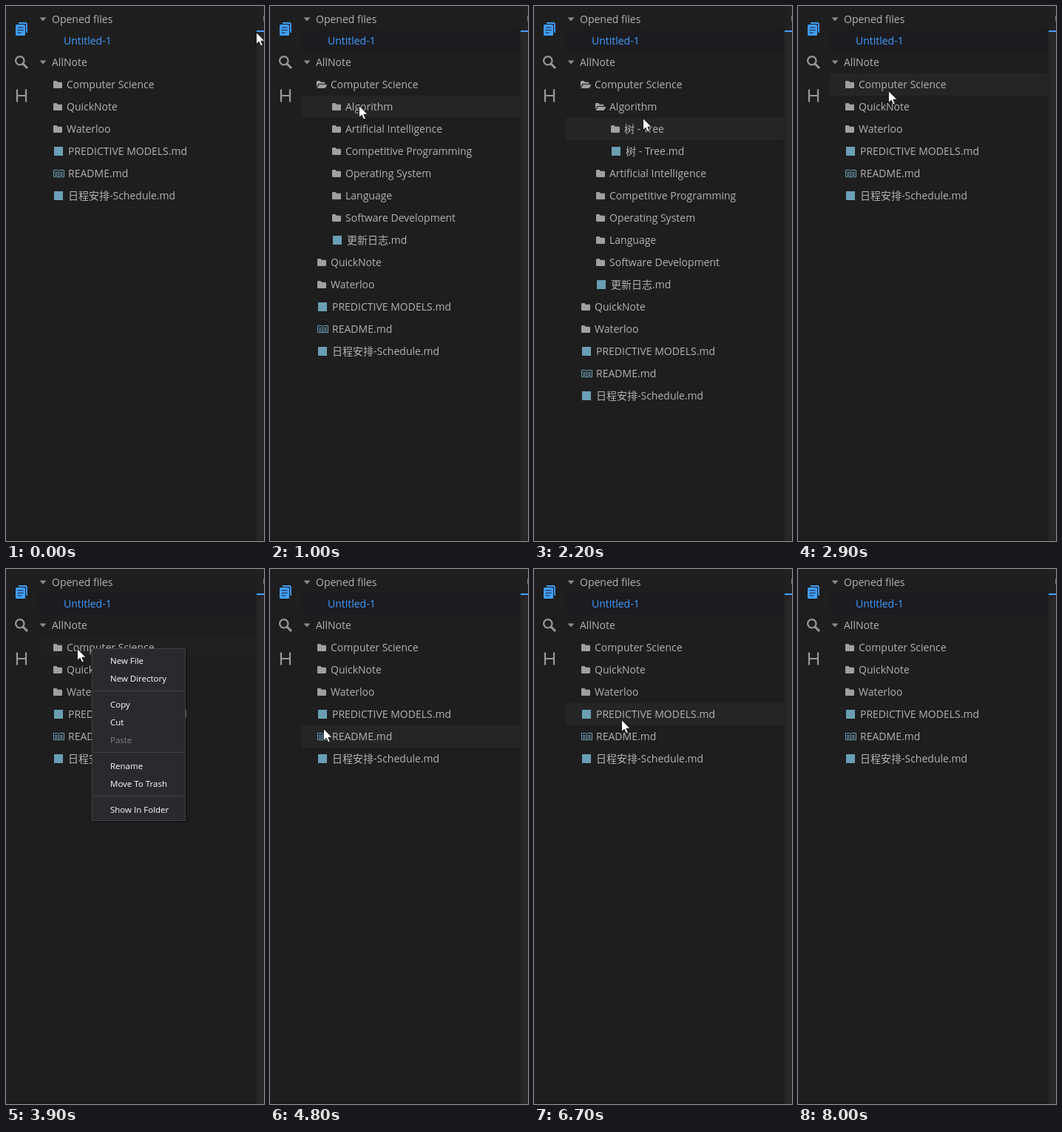
An HTML page for the animation above (8.3 s loop, 349 by 722 pixels).

```html
<!DOCTYPE html>
<html lang="en">
<head>
<meta charset="utf-8">
<title>File tree</title>
<style>
  html, body { margin: 0; width: 100%; height: 100%; overflow: hidden; background: #1e1e1e; }
  svg { display: block; }
  text { font: 14px "Open Sans", "Noto Sans CJK SC", "Noto Sans CJK", sans-serif; fill: #b2b2b2; white-space: pre; }
  #menu text { font-size: 11.5px; fill: #fff; }
  #menu text.off { fill: #808183; }
</style>
</head>
<body>
<svg width="349" height="722" viewBox="0 0 349 722">
  <defs>
    <path id="folder" fill="#a0a0a0" d="M1 1.2Q1 0 2.2 0H5.4L6.9 1.7H11.8Q13 1.7 13 2.9V8.8Q13 10 11.8 10H2.2Q1 10 1 8.8Z"/>
    <path id="open" fill="#a0a0a0" d="M0 8.4V1.2Q0 0 1.1 0H4.4L5.9 1.7H10.2Q11.3 1.7 11.3 2.8V4H3.6Q2.5 4 2 5ZM.6 10L3 5.7Q3.3 5 4.1 5H13.8Q14.6 5 14.2 5.7L12.1 9.3Q11.7 10 10.9 10Z"/>
    <rect id="md" x="2" y="-1" width="12" height="12" fill="#6a9fb5"/>
    <path id="book" fill="none" stroke="#6a9fb5" d="M1.5 .5H7.5L8.5 1.5L9.5 .5H15.5V9.5H9.5L8.5 10.5L7.5 9.5H1.5ZM8.5 1.5V10M3 3.5H7M3 5.5H7M3 7.5H7M10 3.5H14M10 5.5H14M10 7.5H14"/>
  </defs>

  <rect width="349" height="722" fill="#1e1e1e"/>
  <rect x="339" width="10" height="722" fill="#272727"/>
  <rect x="339" width="10" height="33" fill="#212121"/>
  <rect x="339" y="33" width="10" height="2" fill="#409eff"/>
  <rect x="348" y="13" width="1" height="7" fill="#777"/>
  <rect y="720" width="339" height="2" fill="#191919"/>

  <g fill="none" stroke="#409eff" stroke-width="1.8">
    <path d="M17 23H26Q28 23 28 25V36"/>
    <rect x="13" y="25" width="13" height="15" rx="1.5" fill="#409eff" stroke="none"/>
    <path d="M15.5 29H23.5M15.5 32.5H23.5M15.5 36H21" stroke="#1e1e1e" stroke-width="1.2"/>
  </g>
  <g fill="none" stroke="#9a9a9a" stroke-width="2.2">
    <circle cx="18.8" cy="73.8" r="5.7"/>
    <path d="M23 78L29 84" stroke-width="3"/>
    <path d="M15 112.5V129.5M27 112.5V129.5M15 121H27"/>
  </g>

  <rect id="active" x="43" y="32" width="295" height="29" fill="#1b1b20"/>
  <rect id="hover" x="43" width="295" height="30"/>
  <path fill="#8c8c8c" d="M45.5 15.5H54.5L50 20.5ZM45.5 73.5H54.5L50 78.5Z"/>
  <text x="62" y="23">Opened files</text>
  <text x="78" y="52" style="fill:#409eff">Untitled-1</text>
  <text x="62" y="81">AllNote</text>
  <g id="tree"></g>
  <g id="menu"></g>
  <path id="cursor" fill="#fff" stroke="#111" stroke-width=".9" d="M.5 .5V16.6L4.2 13.2L6.7 19L9.3 17.9L6.9 12.2H12Z"/>
</svg>
<script>
const LOOP = 8300, STEP = 100, EXIT = 8000, TOP = 91, ROW = 30;
const $ = id => document.getElementById(id);
const during = (t, [from, to]) => t >= from && t < to;
const show = (el, on) => el.style.display = on ? "" : "none";
const move = (el, x, y) => el.setAttribute("transform", `translate(${x} ${y})`);

function add(parent, tag, attrs, label) {
  const el = document.createElementNS("http://www.w3.org/2000/svg", tag);
  for (const key in attrs) el.setAttribute(key, attrs[key]);
  if (label) el.textContent = label;
  return parent.appendChild(el);
}

// Plain strings are leaves; dir() takes children and the span it stays expanded
const dir = (name, kids = [], span = [0, 0]) => ({ name, kids, span });
const tree = [
  dir("Computer Science", [
    dir("Algorithm", [
      dir("树 - Tree", ["线段树 - Segment.md"], [1700, 2200]),
      "树 - Tree.md"
    ], [1200, 2500]),
    ...["Artificial Intelligence", "Competitive Programming", "Operating System",
      "Language", "Software Development"].map(name => dir(name)),
    "更新日志.md"
  ], [600, 2900]),
  dir("QuickNote"), dir("Waterloo"),
  "PREDICTIVE MODELS.md", "README.md", "日程安排-Schedule.md"
];

const rows = [];
function build(nodes, depth, spans) {
  for (const node of nodes) {
    const { name = node, kids = [], span } = node;
    const g = add($("tree"), "g"), x = 63 + depth * 20;
    const icon = span ? "folder" : name === "README.md" ? "book" : "md";
    const use = add(g, "use", { href: "#" + icon, x, y: 10 });
    add(g, "text", { x: x + (span ? 19 : 21), y: 20 }, name);
    rows.push({ g, use, span, spans });
    build(kids, depth + 1, [...spans, span]);
  }
}
build(tree, 0, []);

// Each menu opens at the pointer
const menus = [[3400, 4200], [4900, 5500]];
const groups = [["New File", "New Directory"], ["Copy", "Cut", "Paste"],
  ["Rename", "Move To Trash"], ["Show In Folder"]];

add($("menu"), "rect", { x: 2, y: 2, width: 127, height: 233, fill: "#000", opacity: .35 });
add($("menu"), "rect", { x: .5, y: .5, width: 126, height: 232, fill: "#292a2d", stroke: "#3f4042" });
let line = 21;
groups.forEach((group, i) => {
  if (i) {
    add($("menu"), "rect", { x: 2, y: line - 12, width: 123, height: 1, fill: "#414245" });
    line += 11;
  }
  for (const label of group) {
    add($("menu"), "text", { x: 25, y: line, class: label === "Paste" ? "off" : "" }, label);
    line += 24;
  }
});

// Pointer strokes: start, end, x, y, sideways bend
const strokes = [
  [0, 400, 104, 101], [500, 1000, 120, 134], [1000, 1400, 129, 166],
  [1600, 1900, 147, 160], [2100, 2300, 147, 142], [2400, 3100, 116, 107],
  [3400, 3900, 96, 107], [4300, 4800, 72, 215, -1.1], [5000, 5400, 277, 342],
  [5400, 5900, 157, 250], [5900, 6700, 118, 203, -.4], [6800, 7700, 211, 189, .5],
  [7700, 7900, 334, 93]
];

function tipAt(t) {
  let x = 338, y = 35;
  for (const [from, to, x1, y1, bend = 0] of strokes) {
    if (t <= from) break;
    const k = Math.min(1, (t - from) / (to - from));
    const ease = k * k * (3 - 2 * k), side = bend * Math.sin(Math.PI * k);
    const dx = x1 - x, dy = y1 - y;
    x += dx * ease - dy * side;
    y += dy * ease + dx * side;
  }
  return [Math.round(x), Math.round(y)];
}

function draw(t) {
  let count = 0;
  for (const { g, use, span, spans } of rows) {
    const on = spans.every(s => during(t, s));
    show(g, on);
    if (on) move(g, 0, TOP + ROW * count++);
    if (span) use.setAttribute("href", during(t, span) ? "#open" : "#folder");
  }

  const tip = tipAt(t), inside = t < EXIT;
  show($("cursor"), inside);
  move($("cursor"), ...tip);

  // An open menu keeps the row it was called on lit
  const menu = menus.find(m => during(t, m));
  const [x, y] = menu ? tipAt(menu[0]) : tip;
  show($("menu"), menu);
  move($("menu"), x, y);

  const row = Math.floor((y - TOP) / ROW);
  show($("hover"), inside && x < 338 && row >= 0 && row < count);
  $("hover").setAttribute("y", TOP + ROW * row);
  $("hover").setAttribute("fill", menu ? "#202020" : "#252525");
  show($("active"), t >= STEP);
}

let start, last;
function tick(now) {
  start ??= now;
  const t = Math.floor((now - start) % LOOP / STEP) * STEP;
  if (t !== last) draw(last = t);
  requestAnimationFrame(tick);
}
draw(0);
requestAnimationFrame(tick);
</script>
</body>
</html>
```
